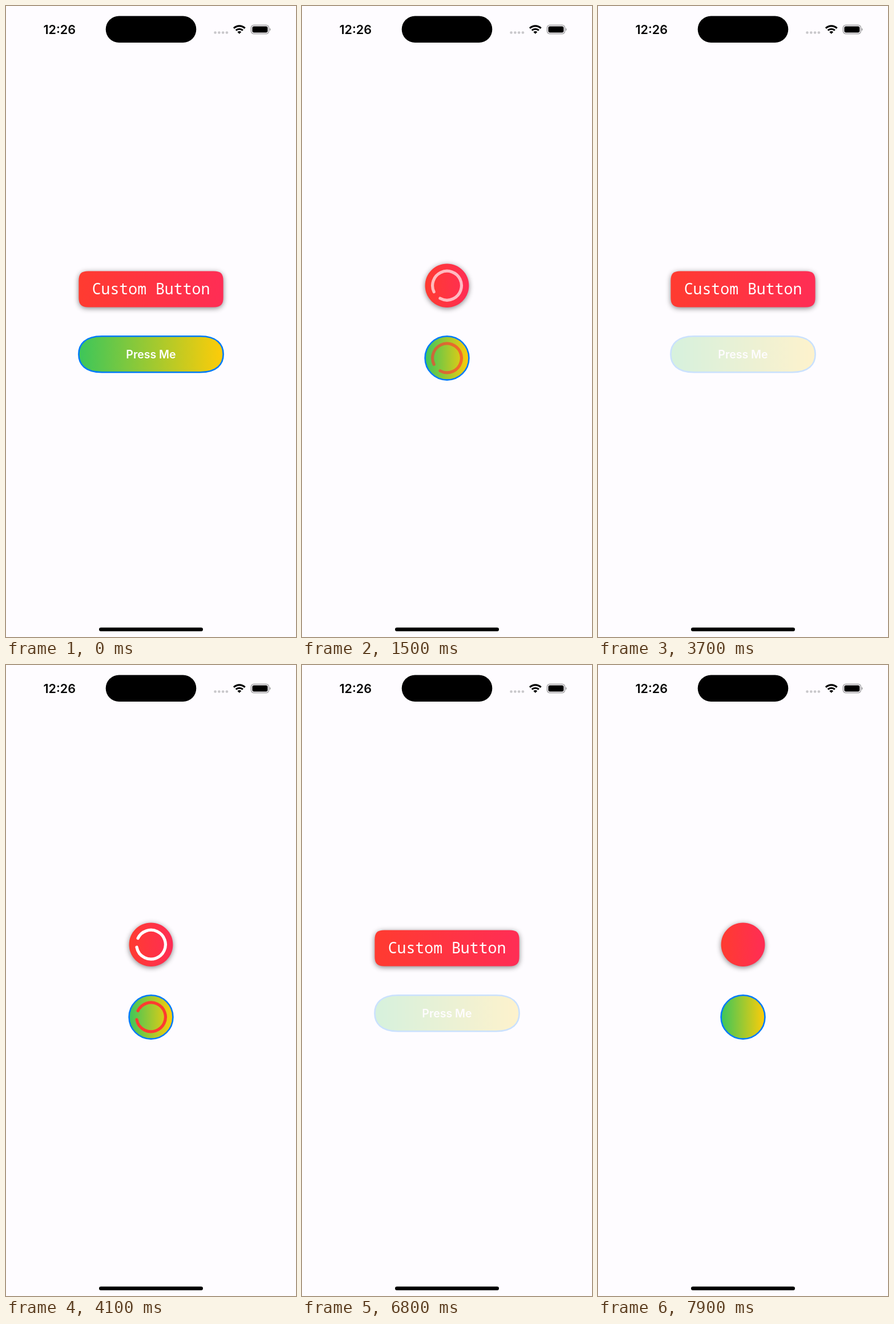
These frames come from a looping animation (508 px wide and 1103 px high, 8 s). An HTML page:

```html
<!DOCTYPE html>
<html lang="en">
<head>
<meta charset="utf-8">
<title>Loading buttons</title>
<style>
  html, body { margin: 0; width: 100%; height: 100%; overflow: hidden; background: #fefcff; }
  svg { display: block; width: 508px; height: 1103px; }
  text { text-anchor: middle; }
  .time { font: 600 21.5px Inter, sans-serif; }
  .mono { font: 400 26.5px "Noto Sans Mono", monospace; fill: #fff; }
  .sans { font: 600 19.5px Inter, sans-serif; fill: #fff; }
  .ring { fill: none; stroke-width: 5.2; stroke-linecap: round; stroke-dasharray: 90 100; }
  #red { filter: drop-shadow(0 2.6px 5px rgba(0, 0, 0, .48)); }
</style>
</head>
<body>
<svg viewBox="0 0 508 1103">
  <defs>
    <linearGradient id="warm"><stop stop-color="#ff3b30"/><stop offset="1" stop-color="#ff2d55"/></linearGradient>
    <linearGradient id="lime"><stop stop-color="#3cc65a"/><stop offset="1" stop-color="#ffcc08"/></linearGradient>
    <clipPath id="redClip"><path/></clipPath>
    <clipPath id="greenClip"><path/></clipPath>
  </defs>

  <text class="time" x="93.7" y="48.7">12:26</text>
  <rect x="174.7" y="17.5" width="158.6" height="46.5" rx="23.25"/>
  <g fill="#c9c8cb">
    <circle cx="366.5" cy="46.5" r="2.3"/><circle cx="373.3" cy="46.5" r="2.3"/>
    <circle cx="380.1" cy="46.5" r="2.3"/><circle cx="386.9" cy="46.5" r="2.3"/>
  </g>
  <g transform="translate(408.8 48.8)" fill="none" stroke="#000" stroke-width="3.1">
    <path d="M-9.83-9.83A13.9 13.9 0 0 1 9.83-9.83M-6.08-6.08A8.6 8.6 0 0 1 6.08-6.08"/>
    <path d="M0 0L-3.4-3.4A4.8 4.8 0 0 1 3.4-3.4Z" fill="#000" stroke="none"/>
  </g>
  <rect x="429.3" y="33.4" width="31.2" height="15.2" rx="4.8" fill="none" stroke="#98979a" stroke-width="1.3"/>
  <rect x="431.4" y="35.4" width="27" height="11.2" rx="3"/>
  <path d="M461.9 38.4q1.7.8 1.7 2.6t-1.7 2.6z" fill="#98979a"/>
  <rect x="163" y="1086.5" width="182" height="6.4" rx="3.2"/>

  <g id="red">
    <path class="body" fill="url(#warm)"/>
    <g clip-path="url(#redClip)"><text class="mono" x="254" y="504">Custom Button</text></g>
    <circle class="ring" r="25.4" pathLength="100" stroke="#fff"/>
  </g>
  <g id="green">
    <path class="body" fill="url(#lime)" stroke="#007aff" stroke-width="2.6"/>
    <g clip-path="url(#greenClip)"><text class="sans" x="254" y="616">Press Me</text></g>
    <circle class="ring" r="25.4" pathLength="100" stroke="#ff3b30"/>
  </g>
</svg>
<script>
const LOOP = 8000, STEP = 100, SHRINK = 290, DIM = 320, FADE = 150, SPIN = 700;
// press time, time the circle opens again, opening duration
const presses = [[500, 1600, 290], [3700, 4500, 200], [6800, 7900, 290]];

const clamp = v => Math.min(1, Math.max(0, v));
const ease = v => { v = clamp(v); return v * v * (3 - 2 * v); };
const mix = (a, b, k) => a + (b - a) * k;

// Rounded rectangle with continuous corners
function smoothRect(x, y, w, h, radius) {
  const r = Math.min(radius, w / 2, h / 2);
  const ex = Math.min(1.28 * r, w / 2), ey = Math.min(1.28 * r, h / 2);
  const handle = e => (2.343 * r - e) / 3;
  const hx = handle(ex), hy = handle(ey), R = x + w, B = y + h;
  return `M${x + ex} ${y}H${R - ex}C${R - hx} ${y} ${R} ${y + hy} ${R} ${y + ey}` +
    `V${B - ey}C${R} ${B - hy} ${R - hx} ${B} ${R - ex} ${B}` +
    `H${x + ex}C${x + hx} ${B} ${x} ${B - hy} ${x} ${B - ey}` +
    `V${y + ey}C${x} ${y + hy} ${x + hx} ${y} ${x + ex} ${y}Z`;
}

function makeButton(id, top, roundTop, radius) {
  const root = document.getElementById(id);
  const body = root.querySelector('.body'), text = root.querySelector('text');
  const ring = root.querySelector('.ring');
  const clip = document.querySelector(`#${id}Clip path`);
  return ({ p, ringAlpha, angle }) => {
    const x = mix(127.4, 215.6, p), y = mix(top, roundTop, p);
    const d = smoothRect(x, y, 508 - 2 * x, mix(63, 76.4, p), mix(radius, 38.4, p));
    body.setAttribute('d', d);
    clip.setAttribute('d', d);
    text.setAttribute('transform', `translate(${x - 127.4} ${y - top})`);
    text.setAttribute('opacity', 1 - p);
    ring.setAttribute('transform', `translate(254 ${roundTop + 38.2}) rotate(${angle})`);
    ring.setAttribute('opacity', ringAlpha);
  };
}

const drawRed = makeButton('red', 463.5, 450.5, 13);
const drawGreen = makeButton('green', 577.2, 577.2, 38.4);
const green = document.getElementById('green');

function stateAt(t) {
  const press = presses.findLast(([start]) => t >= start);
  if (!press) return { p: 0, ringAlpha: 0, angle: 0, dim: 1 };
  const [start, open, length] = press, age = t - start;
  const shrink = ease(age / SHRINK);
  return {
    p: shrink * (1 - ease((t - open) / length)),
    ringAlpha: shrink * clamp((open - t) / FADE),
    angle: age / SPIN * 360,
    dim: mix(.2, 1, clamp(age / DIM))
  };
}

function frame(now) {
  const t = Math.floor(now % LOOP / STEP) * STEP;
  const state = stateAt(t);
  drawRed(state);
  drawGreen(state);
  green.setAttribute('opacity', state.dim);
  requestAnimationFrame(frame);
}
frame(0);
</script>
</body>
</html>
```
